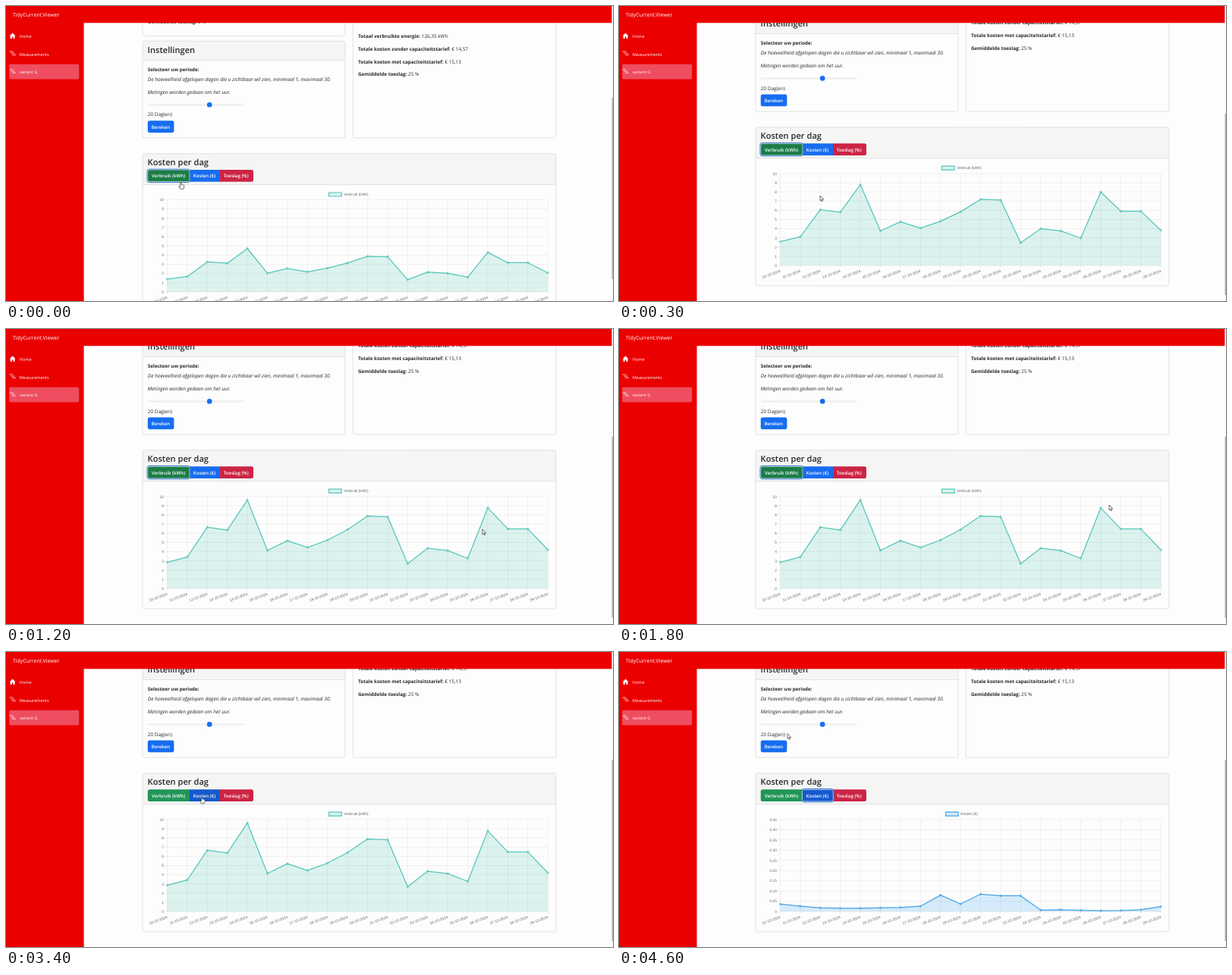
An HTML page with a canvas that plays this animation: 800x389 px, repeating every 4700 ms.

```html
<!DOCTYPE html>
<html lang="nl">
<head>
<meta charset="utf-8">
<title>Kosten per dag</title>
<style>
html, body { margin: 0; width: 100%; height: 100%; overflow: hidden; background: #fdfdfd; }
canvas { display: block; width: 800px; height: 389px; }
</style>
</head>
<body>
<canvas id="stage"></canvas>
<script>
const W = 800, H = 389, LOOP = 4700, SCROLL = 34.8;
const canvas = document.getElementById('stage');
const ctx = canvas.getContext('2d');
const dpr = window.devicePixelRatio || 1;
canvas.width = W * dpr;
canvas.height = H * dpr;

const UI = '"Open Sans", "Noto Sans", sans-serif';
const PLOT = '"Liberation Sans", Arial, sans-serif';
const INK = '#26292d', RED = '#eb0000', BLUE = '#176df0';

const usage = {
  label: 'Verbruik (kWh)', color: '#55c6b7', fill: 'rgba(75,192,175,.19)',
  max: 10, step: 1, legendX: 425.6, start: -155,
  data: [2.85, 3.42, 6.65, 6.35, 9.62, 4.13, 5.2, 4.45, 5.27, 6.4,
         7.88, 7.8, 2.7, 4.38, 4.12, 3.27, 8.762, 6.47, 6.47, 4.2]
};
const costs = {
  label: 'Kosten (€)', color: '#45a2e2', fill: 'rgba(54,155,235,.2)',
  max: 0.45, step: 0.05, legendX: 430.6, start: 3422,
  data: [.036, .026, .018, .016, .016, .018, .02, .026, .08, .037,
         .085, .077, .077, .007, .009, .006, .004, .005, .009, .024]
};

// time, x, y of the pointer tip
const path = [
  [0, 230.5, 232], [300, 265, 250], [1200, 628, 264], [1500, 676, 290],
  [1800, 646, 232], [2000, 634, 235], [2500, 634, 235], [3200, 258, 190.5],
  [3500, 258, 190.5], [3800, 256, 252], [4000, 256, 252], [4200, 248, 208],
  [4600, 222, 107.5]
];

const clamp = v => Math.max(0, Math.min(1, v));
const ramp = (t, a, b) => clamp((t - a) / (b - a));
const smooth = p => p * p * (3 - 2 * p);
const outQuart = p => 1 - Math.pow(1 - p, 4);

function pointerAt(t) {
  const i = path.findIndex(k => k[0] > t);
  if (i < 0) return path[path.length - 1].slice(1);
  const [a, ax, ay] = path[i - 1], [b, bx, by] = path[i];
  const p = smooth(ramp(t, a, b));
  return [ax + (bx - ax) * p, ay + (by - ay) * p];
}

function text(s, x, y, size, color = INK, style = '', family = UI, align = 'left') {
  ctx.font = `${style} ${size}px ${family}`;
  ctx.fillStyle = color;
  ctx.textAlign = align;
  ctx.fillText(s, x, y);
  return ctx.measureText(s).width;
}

function rect(x, y, w, h, color) {
  ctx.fillStyle = color;
  ctx.fillRect(x, y, w, h);
}

function rounded(x, y, w, h, r, fill, stroke, lw = 0.7) {
  ctx.beginPath();
  ctx.roundRect(x, y, w, h, r);
  if (fill) { ctx.fillStyle = fill; ctx.fill(); }
  if (stroke) { ctx.strokeStyle = stroke; ctx.lineWidth = lw; ctx.stroke(); }
}

function line(x1, y1, x2, y2, color, lw) {
  ctx.beginPath();
  ctx.moveTo(x1, y1);
  ctx.lineTo(x2, y2);
  ctx.strokeStyle = color;
  ctx.lineWidth = lw;
  ctx.stroke();
}

function polygon(points, fill, stroke, lw) {
  ctx.beginPath();
  points.forEach(([x, y]) => ctx.lineTo(x, y));
  ctx.closePath();
  ctx.fillStyle = fill;
  ctx.fill();
  if (stroke) { ctx.strokeStyle = stroke; ctx.lineWidth = lw; ctx.stroke(); }
}

function card(x, y, w, h, head) {
  rounded(x, y, w, h, 2.6, '#fdfdfd');
  if (head) {
    rounded(x, y, w, head, [2.6, 2.6, 0, 0], '#f5f5f4');
    line(x, y + head, x + w, y + head, '#d9d9d9', 0.7);
  }
  rounded(x, y, w, h, 2.6, null, '#d6d6d6');
}

function pair(label, value, x, y) {
  const w = text(label, x, y, 6.35, INK, 'bold');
  text(value, x + w + 1.7, y, 6.4);
}

function ring(x, y, w, h, alpha) {
  if (alpha <= 0) return;
  ctx.globalAlpha = alpha;
  rounded(x - 0.1, y - 0.1, w + 0.2, h + 0.2, 2.4, null, '#fff', 0.8);
  rounded(x - 0.8, y - 0.8, w + 1.6, h + 1.6, 3, null, '#2f78d0', 1);
  ctx.globalAlpha = 1;
}

function buttons(t) {
  const y = 216, h = 15.8;
  const green = t < 2350 ? '#1c7c48' : t < 2450 ? '#23894f' : '#219557';
  const overCosts = t >= 3200 && t < 3600;
  const blue = overCosts || t >= 3500 ? '#1559cd' : BLUE;
  rounded(186.8, y, 55.2, h, [2.5, 0, 0, 2.5], green);
  rounded(242, y, 40, h, 0, blue);
  rounded(282, y, 44, h, [0, 2.5, 2.5, 0], '#cd2444');
  ring(186.8, y, 55.2, h, 1 - ramp(t, 2250, 2400));
  ring(241.4, y, 40.8, h, ramp(t, 3420, 3570));
  text('Verbruik (kWh)', 192, 226.3, 6.15, '#fff', '600');
  text('Kosten (€)', 246.8, 226.3, 6.1, '#fff', '600');
  text('Toeslag (%)', 286.8, 226.3, 6.15, '#fff', '600');
}

const X0 = 212.5, X1 = 714.2, TOP = 255.6, BASE = 377;
const px = i => X0 + i * (X1 - X0) / 19;

function chart(set, t) {
  const grow = outQuart(ramp(t, set.start, set.start + 1000));
  const py = v => BASE - v / set.max * (BASE - TOP);
  const grid = 'rgba(0,0,0,.095)';
  const rows = Math.round(set.max / set.step);

  rounded(set.legendX, 246, 16.6, 5, 0, set.fill, set.color, 1.2);
  text(set.label, set.legendX + 19.6, 250.2, 4.92, '#666', '', PLOT);

  for (let i = 0; i <= rows; i++) {
    const v = i * set.step, y = py(v);
    line(209.2, y, X1, y, grid, 0.6);
    const label = set.step === 1 || !i ? String(i) : v.toFixed(2);
    text(label, 208, y + 1.75, 4.92, '#666', '', PLOT, 'right');
  }
  for (let i = 0; i < 20; i++) {
    line(px(i), TOP, px(i), BASE + 3.3, grid, 0.6);
    ctx.save();
    ctx.translate(px(i), BASE + 7);
    ctx.rotate(-20 * Math.PI / 180);
    text(`${10 + i}-10-2024`, 0, 1.75, 4.92, '#666', '', PLOT, 'right');
    ctx.restore();
  }

  const pts = set.data.map((v, i) => [px(i), py(v * grow)]);
  polygon([...pts, [X1, BASE], [X0, BASE]], set.fill);
  ctx.beginPath();
  pts.forEach(([x, y]) => ctx.lineTo(x, y));
  ctx.strokeStyle = set.color;
  ctx.lineWidth = 1.25;
  ctx.lineJoin = 'round';
  ctx.stroke();
  for (const [x, y] of pts) {
    ctx.beginPath();
    ctx.arc(x, y, 1.25, 0, 7);
    ctx.fillStyle = set.fill;
    ctx.fill();
    ctx.lineWidth = 0.6;
    ctx.stroke();
  }
}

function tooltip(t) {
  const alpha = outQuart(ramp(t, 1950, 2350)) * (1 - ramp(t, 2500, 2700));
  if (!alpha) return;
  ctx.globalAlpha = alpha;
  const x = 572.4, y = 261.2, bg = 'rgba(0,0,0,.82)';
  rounded(x, y, 59.6, 18.8, 2.4, bg);
  polygon([[632, y + 7.3], [634, y + 9.4], [632, y + 11.5]], bg);
  text('26-10-2024', x + 2.6, y + 6.7, 4.92, '#fff', 'bold', PLOT);
  rounded(x + 2.8, y + 11.2, 4.6, 4.6, 0, '#dcf2ec', usage.color, 0.7);
  text('Verbruik (kWh): 8.762', x + 8.6, y + 15.2, 4.92, '#fff', '', PLOT);
  ctx.globalAlpha = 1;
}

function page(t) {
  card(180, -60, 267, 99.5);
  pair('Gemiddelde toeslag:', '0 %', 186.8, 23.2);

  card(180, 46.3, 267, 127.7, 25);
  text('Instellingen', 186.6, 62, 11.1, INK, '600');
  text('Selecteer uw periode:', 186.8, 85.5, 6.3, INK, 'bold');
  text('De hoeveelheid afgelopen dagen die u zichtbaar wil zien, minimaal 1, maximaal 30.',
    186.8, 99.2, 6.6, INK, 'italic');
  text('Metingen worden gedaan om het uur.', 186.8, 116, 6.6, INK, 'italic');
  rounded(186.8, 128.8, 127.2, 3, 1.5, '#f1f1f1');
  ctx.beginPath();
  ctx.arc(268.2, 130.2, 3.3, 0, 7);
  ctx.fillStyle = BLUE;
  ctx.fill();
  text('20 Dag(en)', 186.8, 145.3, 6.4);
  rounded(186.8, 151.3, 34.6, 15.7, 2.5, BLUE);
  text('Bereken', 191.8, 161.6, 6.1, '#fff', '600');

  card(457.3, -60, 267.5, 234);
  [['Totaal verbruikte energie:', '126,35 kWh'],
   ['Totale kosten zonder capaciteitstarief:', '€ 14,57'],
   ['Totale kosten met capaciteitstarief:', '€ 15,13'],
   ['Gemiddelde toeslag:', '25 %']
  ].forEach(([a, b], i) => pair(a, b, 464, 42.1 + i * 16.75));

  card(180, 194.7, 544.8, 209, 40.9);
  text('Kosten per dag', 186.6, 210.2, 11.1, INK, '600');
  buttons(t);
  chart(t < 3500 ? usage : costs, t);
  tooltip(t);
}

function listIcon(x, y) {
  [[0, 4.5], [1.6, 5], [3.2, 5]].forEach(([dx, w], i) =>
    line(x + dx, y + i * 2.2, x + dx + w, y + i * 2.2, '#fff', 0.75));
}

function frameBars(scroll) {
  rect(0, 0, W, 22.3, RED);
  rect(0, 22, 102.6, H, RED);
  text('TidyCurrent.Viewer', 9, 13.8, 6.95, '#fff');
  rounded(4.2, 76.8, 92, 19.8, 1.8, '#ee4e60');
  polygon([[8.6, 35.6], [12.5, 39.4], [11.5, 39.4], [11.5, 43], [9.5, 43],
    [9.5, 40.4], [7.7, 40.4], [7.7, 43], [5.7, 43], [5.7, 39.4], [4.7, 39.4]], '#fff');
  listIcon(4.8, 60);
  listIcon(4.8, 83.8);
  text('Home', 17.8, 42.1, 5.55, '#fff');
  text('Measurements', 17.8, 65.6, 5.55, '#fff');
  text('variant G', 17.8, 89, 5.55, '#fff');
  rect(798.4, 0, 1.6, H, '#fafafa');
  rounded(798.7, 121 + 21 * scroll, 1, 239, 0.5, '#8d8d8d');
}

function arrow(x, y) {
  polygon([[0, 0], [0, 6.8], [1.5, 5.4], [2.5, 7.8], [3.5, 7.4], [2.5, 5], [4.7, 5]]
    .map(([a, b]) => [x + a, y + b]), '#fff', '#222', 0.65);
}

function hand(x, y) {
  polygon([[-.7, .6], [0, 0], [.7, .6], [.8, 3.4], [2, 3.4], [3.4, 4], [4.2, 4.6],
    [4.2, 7], [3.2, 9.2], [-.6, 9.2], [-2.7, 6.2], [-2.2, 5.4], [-.7, 6.4]]
    .map(([a, b]) => [x + a, y + b]), '#fff', '#222', 0.65);
}

function draw(t) {
  const scroll = smooth(ramp(t, 0, 250));
  ctx.setTransform(dpr, 0, 0, dpr, 0, 0);
  ctx.textRendering = 'geometricPrecision';
  rect(0, 0, W, H, '#fdfdfd');
  ctx.save();
  ctx.translate(0, -SCROLL * scroll);
  page(t);
  ctx.restore();
  frameBars(scroll);
  const [x, y] = pointerAt(t);
  const onButton = t < 100 || (t >= 3200 && t < 3600);
  (onButton ? hand : arrow)(x, y);
}

const begin = performance.now();
function tick() {
  const t = (performance.now() - begin) % LOOP;
  draw(Math.floor(t / 100) * 100);
  requestAnimationFrame(tick);
}
tick();
</script>
</body>
</html>
```
